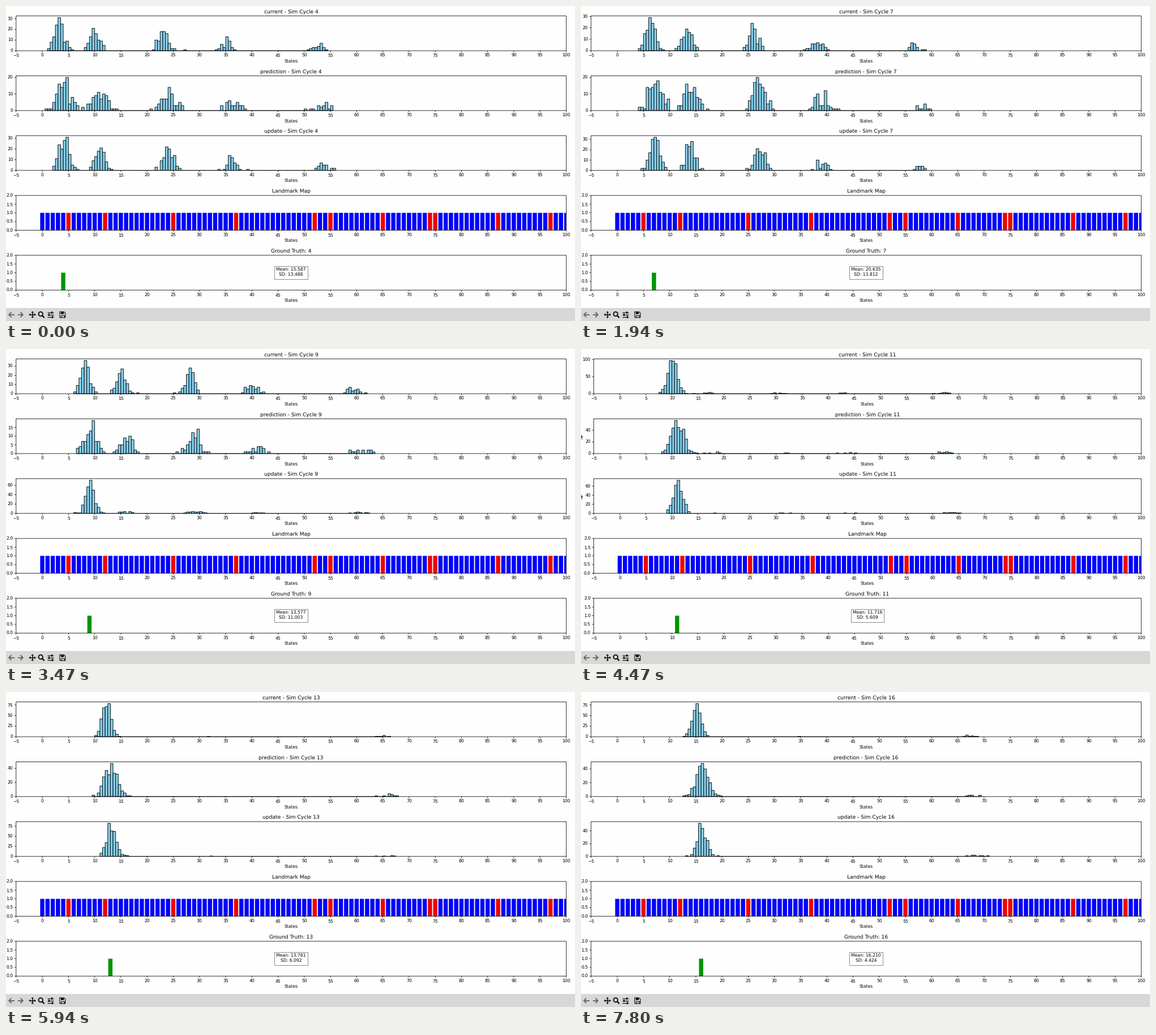
A matplotlib script for the animation above (8 s loop, 1005 by 557 pixels).

```python
import numpy as np
import matplotlib.pyplot as plt
from matplotlib.animation import FuncAnimation
from matplotlib.collections import LineCollection, PolyCollection
from matplotlib.patches import Circle, Polygon, Rectangle

plt.rcParams["font.family"] = "DejaVu Sans"
plt.rcParams["text.hinting"] = "none"
WIDTH, HEIGHT = 1005, 557
PX = 0.72  # points per pixel at 100 dpi
RIGHT, PANEL_H = 989.5, 61.5
BOTTOMS = [79.1 + 105.8 * i for i in range(5)]
WIDE, NARROW = 17.8, 22.4  # left edge of the axes
SMALL, LARGE = 7.6, 9.12
LANDMARKS = {5, 12, 25, 37, 52, 55, 65, 74, 75, 87, 97}
FRAMES, LOOP_MS = 120, 8000
FIRST_CYCLE = 4
STARTS = [0, 10, 19, 29, 37, 47, 56, 65, 77, 89, 97, 107, 117]

STEP = 0.5  # histogram bin width in states
RESOLVED = 9  # cycle in which one hypothesis wins
KEYS = (4, 6, 8, 9, 11, 13, 16)


def mean_sd(cycle):
    return (np.interp(cycle, KEYS, (15.587, 20.002, 21.268, 13.577, 11.716,
                                    13.781, 16.210)),
            np.interp(cycle, KEYS, (13.488, 14.580, 13.044, 11.003, 5.609,
                                    6.092, 4.424)))


def update_peak(cycle):
    return round(np.interp(cycle, (4, 6, 8, 9, 10, 11, 13, 15, 16),
                           (31, 29, 36, 71, 97, 73, 82, 78, 52)))


def prediction_peak(cycle):
    return round(np.interp(cycle, KEYS, (20, 16, 24, 19, 57, 47, 48)))


def shares(cycle):
    """Relative heights of the five position hypotheses."""
    rest = 0.1 * 0.3 ** (cycle - RESOLVED) if cycle >= RESOLVED else 1
    return 1, 0.7 * rest, 0.7 * rest, 0.3 * rest, max(0.17 * rest, 0.03)


def particles(cycle, heights, spread, peak, seed):
    """Noisy sum of bell curves that all travel one state per cycle."""
    edges = np.arange(cycle - 6, cycle + 60, STEP)
    last = np.interp(cycle, (4, 11), (49.5, 52.5))
    density = sum(
        h * np.exp(-((edges + STEP / 2 - cycle - 0.2 - offset) / spread) ** 2
                   / 2)
        for h, offset in zip(heights, (0, 6.9, 19.9, 32, last)))
    counts = np.random.default_rng(seed).poisson(peak * density)
    counts = np.rint(counts * peak / counts.max()).astype(int)
    used = np.flatnonzero(counts)
    return edges[used[0]], counts[used[0]:used[-1] + 1]


def posterior(cycle):
    return particles(cycle, shares(cycle), 0.88, update_peak(cycle), cycle)


def prediction(cycle):
    return particles(cycle, shares(cycle - 1), 1.2, prediction_peak(cycle),
                     100 + cycle)


fig = plt.figure(figsize=(WIDTH / 100, HEIGHT / 100), dpi=100,
                 facecolor="#fefefe")
ax = fig.add_axes([0, 0, 1, 1])
ax.set_xlim(0, WIDTH)
ax.set_ylim(HEIGHT, 0)
ax.axis("off")


def text(x, y, label, size=SMALL, ha="center", va="baseline", **kw):
    return ax.text(x, y, label, size=size * PX, ha=ha, va=va, zorder=4, **kw)


def lines(segments):
    return ax.add_collection(LineCollection(
        segments, colors="black", linewidths=0.8 * PX, zorder=3, snap=False))


def bars(boxes, face, edge="none"):
    """Boxes are (left, right, top, bottom) in pixels."""
    corners = [[(l, b), (l, t), (r, t), (r, b)] for l, r, t, b in boxes]
    return ax.add_collection(PolyCollection(
        corners, facecolors=face, edgecolors=edge,
        linewidths=0.9 * PX, zorder=2, snap=False))


def to_x(state, left):
    return left + (state + 5) * (RIGHT - left) / 105


def y_ticks(left, bottom, values, top, form):
    artists, marks = [], []
    for v in values:
        y = bottom - v / top * PANEL_H
        marks.append([(left - 2.7, y), (left, y)])
        artists.append(text(left - 5.3, y, format(v, form), ha="right",
                            va="center_baseline"))
    return artists + [lines(marks)]


def layout(left):
    """Everything that depends only on the left edge of the axes."""
    artists, segments = [], []
    middle = (left + RIGHT) / 2
    for bottom in BOTTOMS:
        top = bottom - PANEL_H
        segments.append([(left, top), (RIGHT, top), (RIGHT, bottom),
                         (left, bottom), (left, top)])
        for state in range(-5, 101, 5):
            x = to_x(state, left)
            segments.append([(x, bottom), (x, bottom + 2.7)])
            artists.append(text(x, bottom + 11.1,
                                str(state).replace("-", "\u2212")))
        artists.append(text(middle, bottom + 21.6, "States"))
    for bottom in BOTTOMS[3:]:
        artists += y_ticks(left, bottom, np.arange(0, 2.1, 0.5), 2, ".1f")
    base = BOTTOMS[3]
    for colour, is_red in (("blue", False), ("#f00000", True)):
        boxes = [(to_x(s - 0.4, left), min(to_x(s + 0.4, left), RIGHT),
                  base - PANEL_H / 2, base)
                 for s in range(101) if (s in LANDMARKS) == is_red]
        artists.append(bars(boxes, colour))
    artists.append(text(middle, base - PANEL_H - 4.6, "Landmark Map", LARGE))
    artists.append(ax.add_patch(Rectangle(
        (middle - 29.3, 459.6), 58.6, 23, fc="white", ec="gray",
        lw=0.9 * PX, zorder=3)))
    if left == NARROW:
        for bottom in BOTTOMS[1:3]:
            artists.append(text(5, bottom - PANEL_H / 2, "NP", ha="right",
                                va="center", rotation=90))
    return artists + [lines(segments)]


def histogram_panel(left, bottom, name, cycle, histogram):
    start, counts = histogram
    top = counts.max() * 1.05
    edges = to_x(start + STEP * np.arange(len(counts) + 1), left)
    boxes = zip(edges, edges[1:], bottom - counts / top * PANEL_H,
                [bottom] * len(counts))
    step = next(s for s in (1, 2, 5, 10, 20, 25, 50, 100) if top / 4 <= s)
    title = text((left + RIGHT) / 2, bottom - PANEL_H - 4.6,
                 f"{name} - Sim Cycle {cycle}", LARGE)
    return [bars(boxes, "skyblue", "black"), title] + y_ticks(
        left, bottom, range(0, int(top) + 1, step), top, "d")


def left_edge(cycle):
    """Three-digit tick labels push the axes to the right."""
    top = 1.05 * max(update_peak(cycle - 1), update_peak(cycle))
    return NARROW if top >= 100 else WIDE


def cycle_scene(cycle):
    left = left_edge(cycle)
    middle, base = (left + RIGHT) / 2, BOTTOMS[4]
    artists = []
    for bottom, name, data in zip(
            BOTTOMS, ("current", "prediction", "update"),
            (posterior(cycle - 1), prediction(cycle), posterior(cycle))):
        artists += histogram_panel(left, bottom, name, cycle, data)
    mean, sd = mean_sd(cycle)
    artists += [
        bars([(to_x(cycle - 0.4, left), to_x(cycle + 0.4, left),
               base - PANEL_H / 2, base)], "#009400"),
        text(middle, base - PANEL_H - 4.6, f"Ground Truth: {cycle}", LARGE),
        text(middle, 469.3, f"Mean: {mean:.3f}"),
        text(middle, 478, f"SD: {sd:.3f}")]
    return artists


def stroke(points, colour="#111111", width=1.6):
    ax.plot(*zip(*points), color=colour, lw=width * PX, zorder=5,
            solid_capstyle="butt", solid_joinstyle="miter")


def toolbar():
    ax.add_patch(Rectangle((0, 533.5), WIDTH, 24, fc="#d7d7d7", ec="none"))
    y = 545.8
    for tip, d in ((4.5, 1), (30.5, -1)):
        stroke([(tip + d, y), (tip + 10 * d, y)], "#666666", 1.9)
        stroke([(tip + 5 * d, y - 4.5), (tip + 0.7 * d, y),
                (tip + 5 * d, y + 4.5)], "#666666", 1.9)
    cx = 46.7
    stroke([(cx - 5, y), (cx + 5, y)])
    stroke([(cx, y - 5), (cx, y + 5)])
    for dx, dy in ((1, 0), (-1, 0), (0, 1), (0, -1)):
        bx, by = cx + 3.6 * dx, y + 3.6 * dy
        ax.add_patch(Polygon(
            [(cx + 6.3 * dx, y + 6.3 * dy), (bx + 2.5 * dy, by + 2.5 * dx),
             (bx - 2.5 * dy, by - 2.5 * dx)], fc="#111111", zorder=5))
    ax.add_patch(Circle((61.2, y - 1.2), 3.7, fc="none", ec="#111111",
                        lw=1.9 * PX, zorder=5))
    stroke([(63.7, y + 1.4), (67.6, y + 5.3)], width=2.4)
    for dy, knob in ((-4, 80.5), (0, 76), (4, 81.5)):
        stroke([(73, y + dy), (84, y + dy)], width=1.3)
        stroke([(knob, y + dy - 1.8), (knob, y + dy + 1.8)], width=2)
    stroke([(95, y - 5), (102.5, y - 5), (104.7, y - 2.8), (104.7, y + 5),
            (95, y + 5), (95, y - 5.5)], width=1.2)
    ax.add_patch(Rectangle((97, y - 4.5), 5, 3.2, fc="#111111", zorder=5))
    stroke([(97, y + 5), (97, y + 1), (102.7, y + 1), (102.7, y + 5)],
           width=1.1)


toolbar()
layouts = {left: layout(left) for left in (WIDE, NARROW)}
scenes = {c: cycle_scene(c)
          for c in range(FIRST_CYCLE, FIRST_CYCLE + len(STARTS))}


def show_only(groups, key):
    for name, artists in groups.items():
        for artist in artists:
            artist.set_visible(name == key)


def update(frame):
    index = int(np.searchsorted(STARTS, frame, side="right")) - 1
    cycle = FIRST_CYCLE + index
    show_only(layouts, left_edge(cycle))
    show_only(scenes, cycle)
    return []


anim = FuncAnimation(fig, update, frames=FRAMES, interval=LOOP_MS / FRAMES,
                     init_func=lambda: update(0), repeat=True,
                     repeat_delay=0, blit=False)
plt.show()
```
